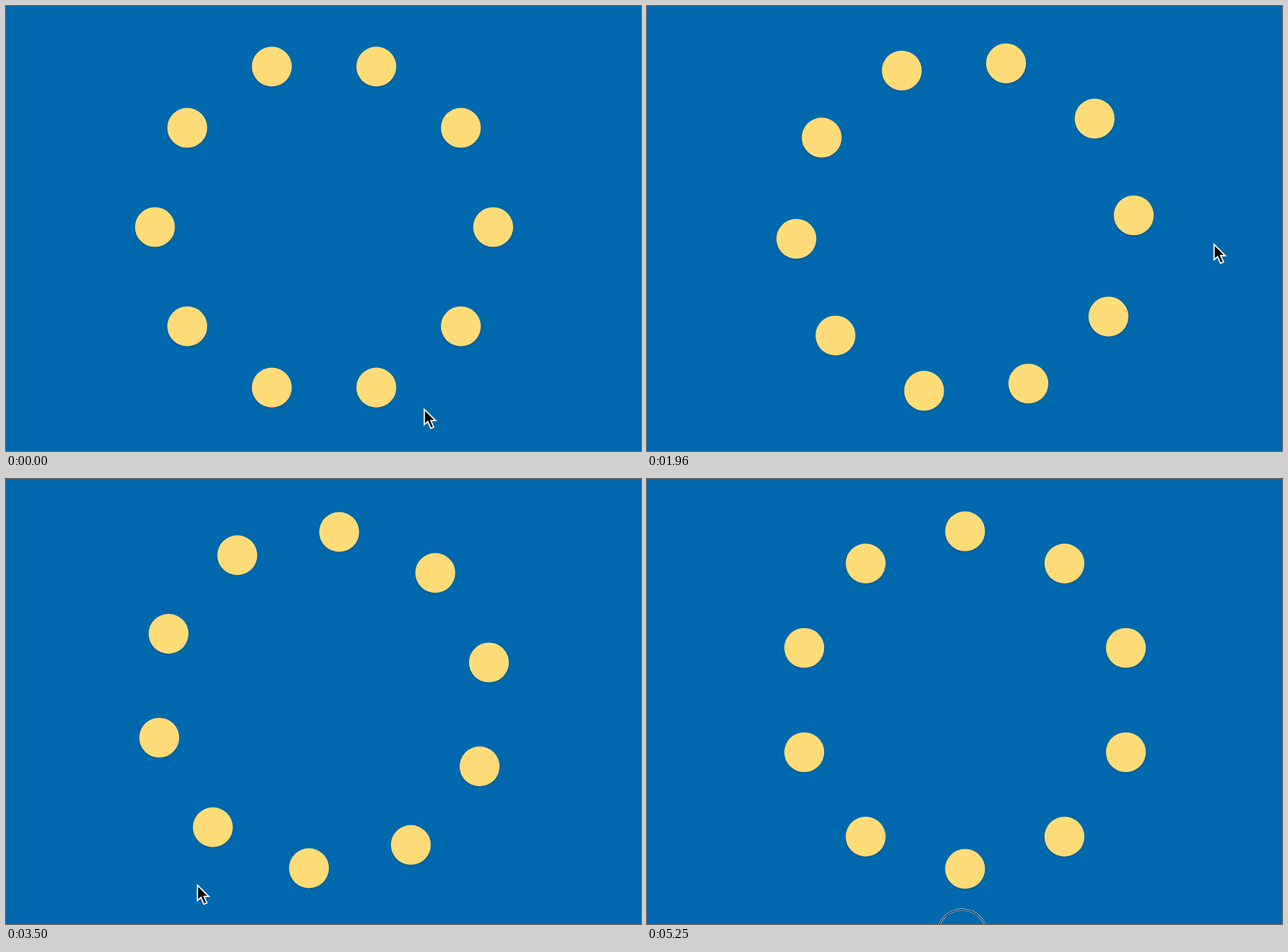
Animation, 893 px wide and 627 px high, one loop 5320 ms. Source, as an HTML page with a canvas:

```html
<!DOCTYPE html>
<html lang="en">
<head>
<meta charset="utf-8">
<title>Rotating dots</title>
<style>
  html, body { margin: 0; width: 100%; height: 100%; overflow: hidden; background: #0069ae; }
  canvas { display: block; }
</style>
</head>
<body>
<canvas id="stage" width="893" height="627"></canvas>
<script>
const ctx = document.getElementById('stage').getContext('2d');
const W = 893, H = 627, LOOP = 5320, STEP = 70;
const CENTER = { x: 447.3, y: 311.5 }, ORBIT = 237.8, DOT = 28.1, COUNT = 10;
const START = 770, BOOST = 2450, STOP = 5250;
const CLICKS = [630, BOOST, STOP];

// Stops of the pointer tip; it eases from one to the next.
const path = [
  { t: 0, x: 588, y: 567 }, { t: 630, x: 588, y: 588 }, { t: START, x: 588, y: 588 },
  { t: 1610, x: 804, y: 397 }, { t: BOOST, x: 786, y: 231 }, { t: 2870, x: 282, y: 620 },
  { t: 3500, x: 269, y: 571 }, { t: 3780, x: 275, y: 640 }, { t: STOP, x: 446, y: 642.5 }
];

const progress = (t, from, to) => Math.min(1, Math.max(0, (t - from) / (to - from)));
const smooth = u => u * u * (3 - 2 * u);

// A slow cubic start, then a quick turn that settles at a quarter circle.
function spin(t) {
  const u = progress(t, START, BOOST), v = progress(t, BOOST, STOP);
  const settle = v + v * (1 - v) * (0.35 + 0.64 * v * v);
  return -11.2 * u ** 3 - 78.8 * settle;
}

function pointerAt(t) {
  const next = path.findIndex(p => p.t > t);
  if (next < 0) return path[path.length - 1];
  const a = path[next - 1], b = path[next];
  const k = smooth(progress(t, a.t, b.t));
  return { x: a.x + (b.x - a.x) * k, y: a.y + (b.y - a.y) * k };
}

function circle(x, y, r) {
  ctx.beginPath();
  ctx.arc(x, y, r, 0, Math.PI * 2);
}

function outline(width, color) {
  ctx.lineWidth = width;
  ctx.strokeStyle = color;
  ctx.stroke();
}

function drawDots(angle) {
  ctx.save();
  ctx.fillStyle = '#ffdc78';
  ctx.shadowColor = 'rgba(0, 0, 0, 0.22)';
  ctx.shadowBlur = 3;
  ctx.shadowOffsetY = 1;
  for (let i = 0; i < COUNT; i++) {
    const a = (angle + i * 360 / COUNT) * Math.PI / 180;
    circle(CENTER.x + ORBIT * Math.cos(a), CENTER.y + ORBIT * Math.sin(a), DOT);
    ctx.fill();
  }
  ctx.restore();
}

function drawRing({ x, y }) {
  circle(x - 2.8, y - 1, 34.8);
  outline(2.8, '#dfe6ec');
  outline(1.4, '#10283c');
}

function drawPointer({ x, y }) {
  ctx.save();
  ctx.translate(x, y);
  ctx.beginPath();
  [[0.3, 1.3], [0.3, 23], [5.2, 18.6], [9.4, 28], [13.4, 26.2], [9.5, 17.2], [16.2, 17.2]]
    .forEach(([px, py]) => ctx.lineTo(px, py));
  ctx.closePath();
  ctx.fillStyle = '#000';
  ctx.fill();
  outline(1.8, '#fff');
  ctx.restore();
}

function draw(t) {
  const pointer = pointerAt(t);
  ctx.fillStyle = '#0069ae';
  ctx.fillRect(0, 0, W, H);
  drawDots(spin(t));
  if (CLICKS.some(c => t >= c && t < c + STEP)) drawRing(pointer);
  drawPointer(pointer);
}

const begin = performance.now();
function tick() {
  const elapsed = (performance.now() - begin) % LOOP;
  draw(Math.floor(elapsed / STEP) * STEP);
  requestAnimationFrame(tick);
}
tick();
</script>
</body>
</html>
```
